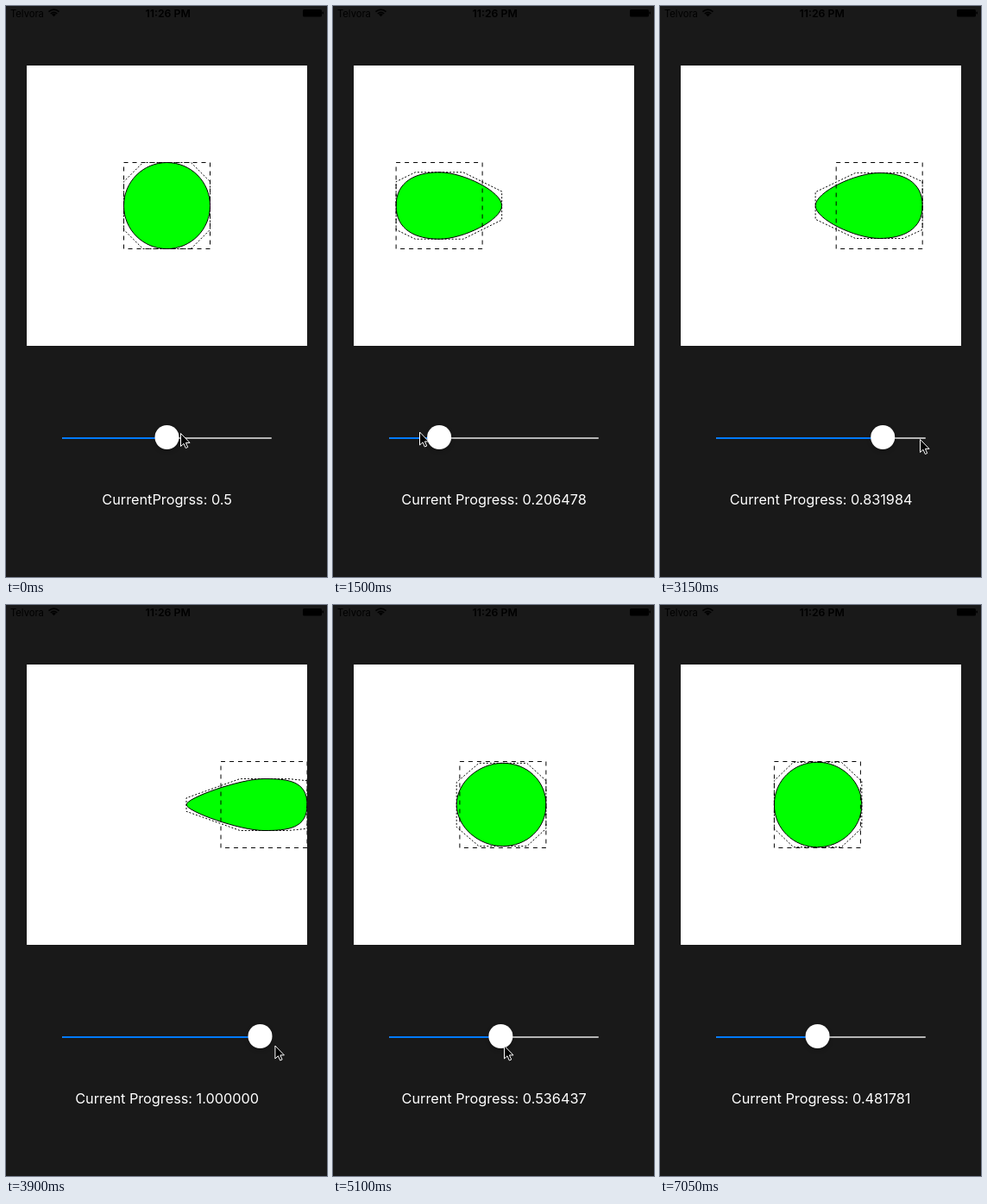
An HTML page that plays this animation: 372x662 px, repeating every 7.62 s.

```html
<!DOCTYPE html>
<html lang="en">
<head>
<meta charset="utf-8">
<title>Elastic blob slider</title>
<style>
  html, body { margin: 0; width: 100%; height: 100%; overflow: hidden; background: #191919; }
  svg { display: block; }
  text { font-family: Inter, "Liberation Sans", sans-serif; }
  .line { fill: none; stroke: #000; }
</style>
</head>
<body>
<svg width="372" height="662" viewBox="0 0 372 662">
  <text x="5" y="12.5" font-size="11.2">Telvora</text>
  <g class="line" stroke-width="1.6">
    <path d="M49.5 6.6Q55.5 1.6 61.5 6.6M51.7 9Q55.5 5.8 59.3 9"/>
    <path d="M53 9.8Q55.5 7.8 58 9.8L55.5 12.3Z" fill="#000" stroke="none"/>
  </g>
  <text x="187.7" y="12.5" font-size="12.3" font-weight="600" text-anchor="middle">11:26 PM</text>
  <rect x="344" y="4" width="22" height="8.5" rx="1.5"/>
  <rect x="366.5" y="6.5" width="1.5" height="3" rx=".7"/>

  <svg x="24" y="69" width="325" height="325" viewBox="24 69 325 325">
    <rect x="24" y="69" width="325" height="325" fill="#fff"/>
    <path id="blob" fill="#0f0" stroke="#000"/>
    <path id="box" class="line" stroke-dasharray="5"/>
    <path id="hull" class="line" stroke-dasharray="2"/>
  </svg>

  <rect x="65" y="500" width="243" height="2" rx="1" fill="#b5b5b5"/>
  <rect id="filled" x="65" y="500" height="2" rx="1" fill="#007aff"/>
  <circle id="thumb" cy="500" r="14" fill="#fff" style="filter: drop-shadow(0 2px 2px #0004)"/>
  <text id="label" x="186.6" y="577.5" font-size="16.25" fill="#fff" text-anchor="middle"></text>
  <path id="cursor" d="M.5 .5V15.5L4 12.3L6.3 17.5L8.7 16.5L6.4 11.4H11Z" stroke="#fff"/>
</svg>
<script>
const LOOP = 7620, STEP = 150, LAG = 30;
const CENTER = 186.5, MIDDLE = 231.5, SIZE = 100, BLOB_TRAVEL = 225, THUMB_TRAVEL = 216;

// Key points of the drag; the slider clamps progress to 0..1.
const drag = [
  { time: 750, progress: .5, x: 190 },
  { time: 1500, progress: .206478, x: 100 },
  { time: 1950, progress: 0, x: 11 },
  { time: 2550, progress: .208502, x: 136.5 },
  { time: 3150, progress: .831984, x: 301 },
  { time: 3600, progress: 1.15, x: 349 },
  { time: 4350, progress: .779352, x: 255 },
  { time: 5100, progress: .536437, x: 198 },
  { time: 5670, progress: .481781, x: 186 }
];

const $ = id => document.getElementById(id);
const set = (id, attributes) => {
  for (const name in attributes) $(id).setAttribute(name, attributes[name]);
};
const clamp = value => Math.min(1, Math.max(0, value));
const phase = (time, start, duration) => clamp((time - start) / duration);

function sample(time, field) {
  const next = Math.max(1, drag.findIndex(key => key.time >= time));
  const [a, b] = time > drag.at(-1).time ? drag.slice(-2) : [drag[next - 1], drag[next]];
  return a[field] + (b[field] - a[field]) * phase(time, a.time, b.time - a.time);
}
const progressAt = time => clamp(sample(time, "progress"));

// Approach, follow the drag while drifting down, then curve out at the bottom.
function cursorAt(time) {
  const approach = 1 - phase(time, 300, 300);
  const drift = phase(time, 2400, 1500);
  const exit = phase(time, 6000, 1050);
  return [
    sample(time, "x") + 12 * approach - 191 * exit + 286 * exit ** 2,
    493.5 + 1.5 * approach + 17 * drift ** 2 * (3 - 2 * drift) + 160 * exit
  ];
}

// Four cubic arcs; the side facing the middle is pulled out into a tip.
function drawBlob(progress) {
  const half = SIZE / 2, handle = SIZE / 3.6;
  const x = CENTER + (progress - .5) * BLOB_TRAVEL;
  const pull = SIZE / 5 * Math.abs(progress - .5) * 2;
  const pullRight = progress <= .5 ? pull : 0, pullLeft = pull - pullRight;
  const right = x + half + pullRight * 2, left = x - half - pullLeft * 2;
  const top = MIDDLE - half + pull, bottom = MIDDLE + half - pull;
  const hr = handle - pullRight, hl = handle - pullLeft;
  const points = [
    [x, top], [x + handle, top], [right, MIDDLE - hr],
    [right, MIDDLE], [right, MIDDLE + hr], [x + handle, bottom],
    [x, bottom], [x - handle, bottom], [left, MIDDLE + hl],
    [left, MIDDLE], [left, MIDDLE - hl], [x - handle, top]
  ];
  set("blob", { d: `M${points[0]}C${points.slice(1).join(" ")} ${points[0]}Z` });
  set("hull", { d: `M${points.join("L")}Z` });
  set("box", { d: `M${x - half} ${MIDDLE - half}h${SIZE}v${SIZE}h${-SIZE}Z` });
}

function draw() {
  const time = Math.floor(performance.now() % LOOP / STEP) * STEP;
  const progress = progressAt(time);
  const thumbX = CENTER + (progress - .5) * THUMB_TRAVEL;
  drawBlob(progressAt(time - LAG));
  set("thumb", { cx: thumbX });
  set("filled", { width: thumbX - 65 });
  set("cursor", { transform: `translate(${cursorAt(time)})` });
  $("label").textContent = time < 900 ? "CurrentProgrss: 0.5" : "Current Progress: " + progress.toFixed(6);
  requestAnimationFrame(draw);
}
draw();
</script>
</body>
</html>
```
